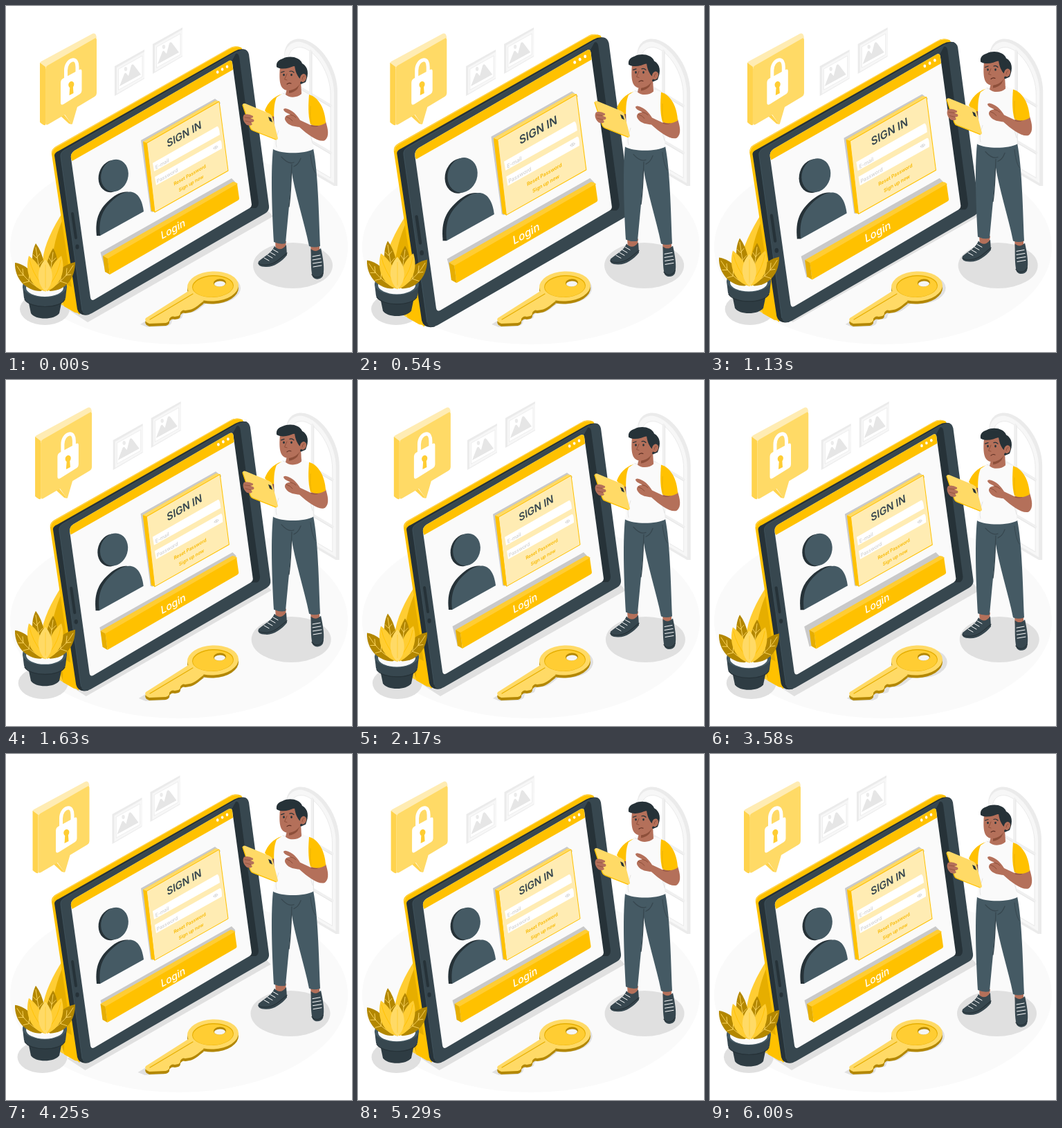
An HTML page with a canvas that plays this animation: 500 px wide and 500 px high, repeating every 6040 ms.

```html
<!DOCTYPE html>
<html lang="en">
<head>
<meta charset="utf-8">
<title>Sign in</title>
<style>
html, body { margin: 0; width: 100%; height: 100%; overflow: hidden; background: #fff; }
canvas { display: block; width: 500px; height: 500px; }
</style>
</head>
<body>
<canvas id="stage"></canvas>
<script>
const LOOP = 6040, CYCLE = 6000;
const Y = '#ffc100', BRIGHT = '#ffcd33', SOFT = '#ffd34d', PALE = '#ffda66', CREAM = '#ffecb3';
const AMBER = '#e6ae00', GOLD = '#b38700';
const DARK = '#37474f', SLATE = '#455a64', INK = '#263238';
const SKIN = '#b4705a', SKIN2 = '#8d4f3a';
const GREY = '#e0e0e0', MIST = '#ebebeb', PAPER = '#fafafa';

const canvas = document.getElementById('stage');
const dpr = window.devicePixelRatio || 1;
canvas.width = canvas.height = 500 * dpr;
const ctx = canvas.getContext('2d');
const paths = new Map();

function path(d) {
  if (!paths.has(d)) paths.set(d, new Path2D(d));
  return paths.get(d);
}
function fill(d, color) {
  ctx.fillStyle = color;
  ctx.fill(path(d));
}
function line(d, color, width = 1) {
  ctx.strokeStyle = color;
  ctx.lineWidth = width;
  ctx.stroke(path(d));
}
function oval(x, y, rx, ry, color, turn = 0) {
  ctx.fillStyle = color;
  ctx.beginPath();
  ctx.ellipse(x, y, rx, ry, turn, 0, Math.PI * 2);
  ctx.fill();
}
function moved(dx, dy, draw) {
  ctx.save();
  ctx.translate(dx, dy);
  draw();
  ctx.restore();
}
// Text lying on the tilted screen plane
function tilted(text, x, y, size, weight, color, align = 'center') {
  ctx.save();
  ctx.transform(0.87, -0.5, 0.13, 0.98, x, y);
  ctx.font = `${weight} ${size}px Inter, Roboto, sans-serif`;
  ctx.textAlign = align;
  ctx.textBaseline = 'middle';
  ctx.fillStyle = color;
  ctx.fillText(text, 0, 0);
  ctx.restore();
}

// Linear interpolation between keys
function keyed(p, stops, values) {
  let i = 1;
  while (i < stops.length - 1 && p > stops[i]) i++;
  const k = (p - stops[i - 1]) / (stops[i] - stops[i - 1]);
  return values[i - 1] + (values[i] - values[i - 1]) * k;
}
const TENTHS = [0, .1, .2, .3, .4, .5, .6, .7, .8, .9, 1];
const shake = p => keyed(p, TENTHS, [0, -1, 2, -4, 4, -4, 4, -4, 2, -1, 0]);
const beat = p => keyed(p, [0, .1, .3, .4, .5, .6, 1], [1, 1.1, 1, 1, 1.1, 1, 1]);
const hover = p => 1 - Math.abs(1 - (p * 2 % 1) * 2);

function arch() {
  fill('M402 216 V72 C402 55 413 45 429 48 C456 54 479 91 479 124 V260 L474 260 L402 218 Z', MIST);
  fill('M402 214 V76 C402 60 412 50 426 52 C452 58 474 94 474 126 V256 Z', '#f7f7f7');
  fill('M408 212 V79 C408 65 416 58 428 60 C449 65 469 98 469 128 V248 Z', '#fff');
  line('M408 212 V79 C408 65 416 58 428 60 C449 65 469 98 469 128 V248 Z', MIST, 1);
  line('M440 65 V230 M408 108 L469 144 M408 176 L469 212', '#f0f0f0', 4);
  line('M442 66 V231 M408 110 L469 146 M408 178 L469 214', '#e6e6e6', 1);
}

function picture() {
  fill('M157 87 L200 63 V105 L157 130 Z', MIST);
  fill('M160 89 L200 66 V104 L160 127 Z', '#f7f7f7');
  fill('M163 91 L197 72 V102 L163 121 Z', '#fff');
  line('M163 91 L197 72 V102 L163 121 Z', MIST, .8);
  fill('M164 116 L171 98 Q173 95 175 99 L177 101 L181 86 Q183 82 186 87 L195 99 Z', '#e6e6e6');
  oval(173, 91, 2.2, 3, MIST);
}

function bubble() {
  fill('M49 83 Q49 81 51 80 L125 40 Q130 38 131 46 L57 90 Z', CREAM);
  fill('M49 82 L57 88 V172 Q54 173 49 168 Z', SOFT);
  fill('M84 157 L95 171 L91 170 L79 159 Z', SOFT);
  fill('M57 91 Q57 88 60 86 L128 47 Q131 45 131 49 V126 Q131 129 128 131 L103 146 L96 170 Q95 172 94 170 L85 157 L61 171 Q57 173 57 169 Z', PALE);
}
function padlock() {
  line('M86.5 104 V93 C86.5 85 91 79 96 78 C101 77 103 82 103 88 V96', '#fff', 5);
  fill('M79 111 Q79 107 82 105 L106 92 Q109.5 90.5 109.5 94 V122 Q109.5 125 107 127 L83 142 Q79 144 79 140 Z', '#fff');
  oval(94.3, 113.5, 4, 4.8, BRIGHT, .3);
  fill('M92.5 114 L96.5 112 L97.5 126 L91.5 129 Z', BRIGHT);
}

const SHAFT = 'M265 411 L202 451 Q200 453 203 457 L207 459 L231 458 Q237 456 236 452 Q239 447 244 449 L249 448 Q252 447 252 443 Q255 438 259 440 L265 439 C272 438 277 433 286 426 Z';
function keyShape(color) {
  oval(299, 405, 37, 21.5, color, -.05);
  fill(SHAFT, color);
}
function shadows() {
  fill('M92 440 L118 457 L386 304 L372 289 Z', GREY);
  oval(414.5, 375, 57.5, 33, GREY);
  oval(56, 438, 36, 23, GREY);
  moved(3, 4, () => keyShape(GREY));
  fill('M194 460 L204 464 L232 463 L240 456 L212 449 Z', GREY);
}

function stand() {
  fill('M82 298 C68 320 55 345 53 368 L60 420 L100 443 Z', BRIGHT);
  fill('M83 306 C74 326 67 350 66 380 L84 432 L100 440 Z', AMBER);
  fill('M84 400 L98 408 L106 444 L100 443 L84 434 Z', Y);
}

function form() {
  fill('M195 194 L302 134 L310 140 L212 298 L209 297 Z', '#c9c9c9');
  fill('M198 196 L302 137 L308 138 L215 298 L210 296 Z', Y);
  fill('M198 196 L303 136.5 L308 138 L204 198 Z', PALE);
  fill('M203.5 198 L308 138 L321 238 L215 298 Z', CREAM);
  line('M203.5 198 L308 138 L321 238 L215 298 Z', Y, 1);
  tilted('SIGN IN', 257.5, 186, 15.4, 600, DARK);
  fill('M212 227 L305 174 Q308 173 309 186 L214 239 Z', '#fff');
  fill('M215 247 L309 194 Q312 193 312 206 L217 259 Z', '#fff');
  tilted('E-mail', 216, 234, 7.4, 500, '#cfcfcf', 'left');
  tilted('Password', 218, 254, 7.4, 500, '#cfcfcf', 'left');
  line('M300 206 Q302 201 306 203 Q304 208 300 206', '#d2d2d2', .9);
  oval(303, 204.5, 1, 1, '#d2d2d2');
  tilted('Reset Password', 265.5, 244.5, 6.9, 600, '#f8b900');
  tilted('Sign up now', 267.5, 256.5, 6.9, 600, '#f8b900');
}

const BUST = 'M136 332 C133 306 141 292 156 279 C178 261 195 266 199 297 Z';
function person() {
  oval(153, 246, 19, 23.5, INK, .3);
  oval(157, 245, 19.5, 23.5, SLATE, .3);
  moved(-5, 0, () => fill(BUST, INK));
  fill('M131 332 L136 332 L140 318 L132 318 Z', INK);
  fill(BUST, SLATE);
}

function loginBar(dx) {
  fill('M136.5 356 L326 249 L331 254 L331 276 L144 385 Z', '#c9c9c9');
  moved(dx, 0, () => {
    fill('M140 361 L328 254 Q332 254 335 257 L148 366 Z', BRIGHT);
    fill('M140 361 L147 365 L150 388 L143 384 Z', AMBER);
    fill('M147 365 L334 257 L337 278 Q337 280 335 281 L150 388 Z', Y);
  });
  tilted('Login', 241.5, 323, 15.2, 500, '#fff');
}

function tablet(dx) {
  stand();
  fill('M66 214 Q65 207 72 203 L322 61.5 Q330 56 340 60 L344 68 L106 446 L100 440 Z', Y);
  line('M67 212 Q67 207 73 203.5 L322 62 Q329 58 336 59', PALE, 1);
  fill('M70 216 Q70 212 76 209.5 L330 65.5 Q338 61 346 63 L350 70 L120 446 Q106 449 103 438 Z', INK);
  fill('M79 218 Q78 212 84 208.5 L334 66 Q348 58 351 70 L380 289 Q381 296 374 300 L124 444 Q112 450 110 440 Z', DARK);
  line('M110 440 L79 218 Q78 212 84 208.5 L334 66', SLATE, .7);
  fill('M326 80 L332 69 Q336 68 337 74 L365 284 Q365 290 361 292 L352 292 Z', INK);
  fill('M94 220 Q93 213 99 209 L321 80 Q326 77 327 82 L355 287 Q355 290 352 292 L128 424 Q123 427 122 421 Z', PAPER);
  fill('M94 220 Q93 213 99 209 L321 80 Q326 77 327 82 L328 92 L95.5 224 Z', Y);
  for (let i = 0; i < 3; i++) oval(305.7 + i * 6.9, 95.5 - i * 3.9, 1.8, 2.2, '#fff');
  line('M96 300 L101 335', INK, 4);
  oval(103, 348, 2.6, 3.4, INK);
  person();
  form();
  loginBar(dx);
}

function leaf(d, vein, color, veinColor) {
  fill(d, color);
  line(vein, veinColor, .9);
}
function plant() {
  fill('M31 420 L36 444 C42 454 70 454 77 444 L82 420 Z', '#2e3c43');
  fill('M24 405 L26 422 C32 438 80 438 86 422 L88 405 Z', DARK);
  line('M27 424 C35 438 78 438 85 424', INK, 1.2);
  oval(56, 405, 32, 16, SLATE);
  oval(56, 407, 27, 13, PAPER);
  leaf('M53 406 C39 390 33 362 43 343 C55 359 59 383 57 406 Z',
    'M51 400 L43 349 M44 364 L39 359 M44 364 L49 358 M46 376 L38 370 M46 376 L53 368', GOLD, PALE);
  leaf('M58 407 C55 384 59 364 68 350 C78 366 76 388 62 408 Z',
    'M62 400 L68 356 M66 370 L62 364 M66 370 L72 364 M65 382 L60 374 M65 382 L74 374', GOLD, PALE);
  leaf('M50 412 C29 412 12 394 13 371 C30 373 46 391 54 410 Z',
    'M46 407 Q27 395 16 376 M25 389 L18 389 M25 389 L24 380 M33 398 L25 400 M33 398 L34 387', GOLD, PALE);
  leaf('M62 411 C66 390 80 374 100 370 C100 393 87 411 64 412 Z',
    'M67 407 Q87 393 97 375 M87 389 L94 388 M87 389 L88 379 M79 398 L88 401 M79 398 L79 386', GOLD, PALE);
  leaf('M55 412 C34 405 27 382 33 361 C49 372 58 392 58 412 Z', 'M51 402 Q38 385 34 367', BRIGHT, Y);
  leaf('M59 412 C59 390 66 371 80 361 C87 382 79 404 60 412 Z', 'M64 402 Q76 386 79 367', BRIGHT, Y);
  leaf('M57 413 C42 399 45 377 57 366 C69 380 71 400 57 413 Z', 'M57 407 V374', PALE, BRIGHT);
}

function goldKey() {
  moved(0, 4, () => keyShape(GOLD));
  keyShape(PALE);
  oval(299, 405, 30, 16, AMBER, -.05);
  oval(299, 405.6, 29, 15, BRIGHT, -.05);
  line('M270 416 L208 453', AMBER, 1.2);
  oval(309, 400, 9, 5.5, GOLD, -.05);
  oval(309, 401.5, 8, 3.9, '#f5f5f5', -.05);
}

function shoes() {
  fill('M389 339 L405 340 L403 353 L390 354 Z', SKIN);
  fill('M440 344 H453 V358 H441 Z', SKIN);
  fill('M365 369 C373 362 384 357 388 347 C394 354 400 352 405 345 L406 360 C398 370 386 378 375 377 C367 377 363 374 365 369 Z', DARK);
  line('M365 372 C371 376 385 375 395 366 L406 357', INK, 1.2);
  line('M373 364 L380 368 M378 360 L385 364 M382 356 L389 360 M386 352 L393 356', '#fff', 1);
  fill('M440.5 351 C446 356 451 354 455 350 C458 364 461 379 458 390 C455 396 446 396 443 391 C440 380 441 365 440.5 351 Z', DARK);
  line('M442 388 C446 394 455 393 458 386', INK, 1.2);
  line('M443 362 L454 360 M443 367 L455 365 M443.5 372 L456 370 M444 377 L456 375', '#fff', 1);
}

function legs() {
  fill('M411 211 L444 206 C451 240 452 300 454 347 Q446 350 438 347 C431 312 417 270 412 235 Z', SLATE);
  fill('M386 206 C382 245 385 305 387 341 Q396 345 404 343 C407 310 411 272 413 240 L420 209 Z', SLATE);
  line('M398 218 C405 226 411 228 416 226 M413 229 C412 250 412 270 409 290 M426 220 C423 228 420 230 416 232', DARK, 1.3);
  line('M440 215 C441 225 443 235 447 241', DARK, 1);
}

function head() {
  fill('M407 115 L426 108 L427 127 C421 133 409 133 404 128 Z', SKIN);
  fill('M409 122 C417 121 422 117 425 112 L421 120 Q416 125 409 126 Z', SKIN2);
  fill('M391 88 C390 80 395 78 400 76 C410 71 425 74 428 83 C437 88 438 98 433 110 L426 113 L415 96 Z', INK);
  fill('M396 88 C395 99 395 108 397 114 C400 123 410 124 416 119 C423 115 427 110 428 103 L424 104 C420 100 420 92 418 87 Z', SKIN);
  fill('M391 88 C398 93 410 90 417 86 C418 95 421 101 425 105 L428 96 L424 80 L400 78 Z', INK);
  oval(429.5, 104, 4.5, 6, SKIN, .3);
  line('M428 106 Q428 102 431 101', SKIN2, .9);
  oval(401.5, 99.5, 1.3, 1.8, INK);
  oval(412.5, 99.5, 1.3, 1.8, INK);
  line('M397.5 96 L402 94.5 M410 94.5 Q413 93 416 96', INK, 1.2);
  line('M406 98 L402.5 106 L406 107', SKIN2, 1);
  line('M406 113 Q409 110.5 412 112', '#5b2d22', 1.1);
}

function man() {
  shoes();
  legs();
  fill('M377 148 L390 152 L390 184 L376 184 Z', SKIN2);
  fill('M399 127 C386 131 378 140 374 151 Q380 160 389 160 Z', Y);
  fill('M400 126 Q414 134 428 124 L441 129 C448 147 441 171 444 207 C431 214 398 214 386 207 C391 178 383 151 391 132 Z', PAPER);
  line('M400 126 Q414 134 428 124 M394 180 Q388 195 391 204 M441 170 Q438 184 443 198', '#e4e4e4', 1);
  head();
  fill('M440 172 L425 165 C420 157 414 150 404 148 C400 148 400 151 405 154 L411 157 C405 157 401 161 404 166 C409 174 418 174 424 175 C437 187 453 198 461 194 C468 188 465 177 462 167 Z', SKIN);
  line('M411 157 Q416 158 419 161 M405 160 Q411 162 414 166 M441 173 Q447 175 451 173', SKIN2, 1);
  fill('M438 128 C452 132 461 149 462 169 Q451 176 440 171 C436 158 437 140 438 128 Z', Y);
  line('M440 145 Q439 159 441 170', AMBER, .8);
  fill('M342 143 Q342 140 346 141 L380 155 Q384 157 385 160 L393 191 Q393 194 389 193 L357 180 Q354 179 353 176 Z', PALE);
  line('M342 143 L353 176 Q354 179 357 180 L390 193', Y, 1.3);
  fill('M379 160 L383 162 L385 168 L381 166 Z', INK);
  fill('M344 157 Q350 155 357 159 Q358 162 353 162 L358 164 Q360 168 354 168 L356 171 Q354 174 348 172 C343 168 341 161 344 157 Z', SKIN);
  line('M345 161 L353 162 M346 166 L354 168', SKIN2, .8);
}

function draw(t) {
  const p = (t % CYCLE) / CYCLE;
  const dx = shake(p), up = hover(p), s = beat(p);
  ctx.setTransform(dpr, 0, 0, dpr, 0, 0);
  ctx.lineCap = ctx.lineJoin = 'round';
  ctx.fillStyle = '#fff';
  ctx.fillRect(0, 0, 500, 500);
  oval(250, 348, 244, 141, PAPER);
  moved(3 * up, 0, arch);
  moved(dx, 0, picture);
  moved(dx + 55, -32, picture);
  moved(3 * dx, 0, bubble);
  moved(2 * dx, 0, padlock);
  moved(dx, 0, shadows);
  ctx.save();
  ctx.translate(223, 252);
  ctx.scale(s, s);
  ctx.translate(-223, -252);
  tablet(dx);
  ctx.restore();
  moved(0, -10 * up, plant);
  goldKey();
  moved(0, -10 * up, man);
}

const start = performance.now();
function frame() {
  draw((performance.now() - start) % LOOP);
  requestAnimationFrame(frame);
}
frame();
</script>
</body>
</html>
```
